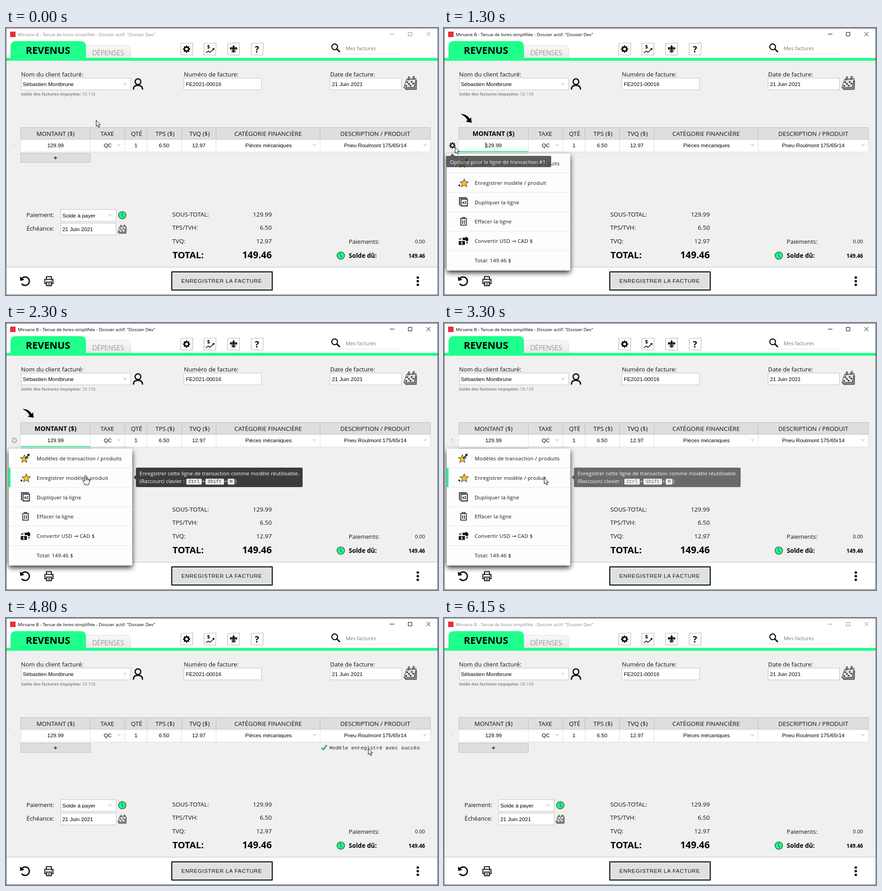
Write an HTML page that moves like this. It is 951 px wide and 589 px high and loops after 6250 ms.

```html
<!DOCTYPE html>
<html lang="fr">
<head>
<meta charset="utf-8">
<title>Tenue de livres</title>
<style>
html, body { margin: 0; width: 100%; height: 100%; overflow: hidden; background: #fff; }
svg { display: block; position: absolute; left: 0; top: 0; }
text { white-space: pre; }
.o { font-family: "Open Sans", "Noto Sans", sans-serif; }
.a { font-family: "Liberation Sans", Arial, sans-serif; }
.m { font-family: "Liberation Mono", "Courier New", monospace; }
.d { font-family: "DejaVu Sans", sans-serif; }
#menu { filter: drop-shadow(0 5px 6px rgba(0, 0, 0, .8)); }
#save { filter: drop-shadow(0 0 1.5px rgba(30, 255, 140, .7)); }
</style>
</head>
<body>
<svg id="stage" width="951" height="589" viewBox="0 0 951 589"></svg>
<script>
const GREEN = '#1eff8c', LOOP = 6250, STEP = 50;
const stage = document.getElementById('stage');

// ---- drawing helpers ----
const attrs = o => Object.entries(o).map(([k, v]) => `${k}="${v}"`).join(' ');
const text = (x, y, s, size, o = {}) => {
  const { cls = 'o', fill = '#111', ...rest } = o;
  return `<text class="${cls}" x="${x}" y="${y}" font-size="${size}" fill="${fill}" ${attrs(rest)}>${s}</text>`;
};
const mid = { 'text-anchor': 'middle' }, end = { 'text-anchor': 'end' }, bold = { 'font-weight': 700 };
const field = (x, y, s, o = {}) => text(x, y, s, 11.8, { cls: 'a', fill: '#000', ...o });
const rect = (x, y, w, h, fill, o = {}) =>
  `<rect x="${x}" y="${y}" width="${w}" height="${h}" fill="${fill}" ${attrs(o)}/>`;
const box = (x, y, w, h, fill = '#fff', stroke = '#c2c2c2') =>
  rect(x + .5, y + .5, w - 1, h - 1, fill, { stroke });
const path = (d, o = {}) => `<path d="${d}" ${attrs(o)}/>`;
const line = (d, w = 1, stroke = '#000', o = {}) =>
  path(d, { fill: 'none', stroke, 'stroke-width': w, ...o });
const circle = (x, y, r, fill, o = {}) => `<circle cx="${x}" cy="${y}" r="${r}" fill="${fill}" ${attrs(o)}/>`;
const at = (x, y, s, k = 1) => `<g transform="translate(${x} ${y}) scale(${k})">${s}</g>`;
const group = (id, s) => `<g id="${id}">${s}</g>`;
const drop = (x, y) => path(`M${x - 4.5} ${y - 2.5}h9l-4.5 5z`, { fill: '#dcdcdc' });

function gear(x, y, r, o = {}) {
  const pts = [];
  for (let i = 0; i < 8; i++)
    for (const [da, k] of [[-.34, .74], [-.22, 1], [.22, 1], [.34, .74]]) {
      const a = (i + da) * Math.PI / 4;
      pts.push(`${(x + Math.sin(a) * r * k).toFixed(2)} ${(y - Math.cos(a) * r * k).toFixed(2)}`);
    }
  const h = r * .38;
  return path(`M${pts.join('L')}ZM${x - h} ${y}a${h} ${h} 0 1 0 ${2 * h} 0a${h} ${h} 0 1 0 ${-2 * h} 0Z`,
    { 'fill-rule': 'evenodd', ...o });
}

function star(x, y, r) {
  let d = '';
  for (let i = 0; i < 10; i++) {
    const a = i * Math.PI / 5, k = i % 2 ? r * .43 : r;
    d += `${i ? 'L' : 'M'}${(x + Math.sin(a) * k).toFixed(2)} ${(y - Math.cos(a) * k).toFixed(2)}`;
  }
  return path(d + 'Z', { fill: '#fcc21b', stroke: '#222', 'stroke-width': 1, 'stroke-linejoin': 'round' });
}

const clock = (x, y) => circle(x, y, 8.3, GREEN, { stroke: '#222', 'stroke-width': 1.1 }) +
  line(`M${x - .5} ${y - 6}V${y + .5}L${x + 3} ${y + 4}`, 1.3, '#164');

const tile = x => path(`M${x} 34L${x + 26.5} 33L${x + 25.5} 60L${x - .5} 59Z`,
  { fill: '#fdfdfd', stroke: '#b9b9b9', 'stroke-width': 1.2 });

function calendar() {
  let s = path('M24 7L28 10L27.500 29.500L4 30L0 25Z', { fill: '#888', stroke: '#222' }) +
    path('M6 7L27 5L22.500 24.500L0 25.500Z', { fill: '#fff', stroke: '#222', 'stroke-width': 1.1 }) +
    path('M6 7L27 5L26.200 8.500L5 10.500Z', { fill: '#999' });
  for (let r = 0; r < 3; r++)
    for (let c = 0; c < 4; c++)
      s += rect(5.6 + c * 4.8 - r * 1.3, 12 + r * 4.2 - c * .3, 3.8, 3, (r + c) % 2 ? '#ccc' : '#222');
  return s + line('M9.500 9V3q1.500-3 3 0V7M20 8V2q1.500-3 3 0V6', 1.4, '#222');
}

// ---- window ----
const bar = rect(0, 0, 951, 589, '#fff') + rect(9, 8, 12, 12, '#e8303a') +
  group('caption', text(26, 17.5, 'Mirvane B - Tenue de livres simplifiée - Dossier actif: "Dossier Dev"', 9.85, { fill: 'currentColor' }) +
    line('M845 13.5h10M885.5 9.5h8v8h-8zM925.5 9l9 9M934.5 9l-9 9', 1, 'currentColor'));

const tabs = `<linearGradient id="tab" x1="0" y1="0" x2="0" y2="1">
  <stop offset="0" stop-color="#f8f8f8"/><stop offset="1" stop-color="#e9e9e9"/></linearGradient>` +
  path('M172 66V38H264Q275 38 275 49V66Z', { fill: 'url(#tab)', stroke: '#dedede' }) +
  path('M10 68V41Q10 29 22 29H164Q176 29 176 41V68Z', { fill: GREEN }) +
  rect(0, 66, 951, 6.5, GREEN) +
  text(92.5, 56.5, 'REVENUS', 21.5, { ...mid, ...bold, fill: '#000' }) +
  text(190, 60, 'DÉPENSES', 14.7, { fill: '#666', 'font-weight': 300 });

const fleur = path('M0-9Q4.600-4 1.400 1.500H-1.400Q-4.600-4 0-9Z') +
  [1, -1].map(k => `<g transform="scale(${k} 1)">` +
    path('M2.600 1.500Q2.400-4 5.500-4.200Q9.500-3.500 7.500 .8Q6.500 2 5.400 1Q6.400-.8 5.100-1.200Q3.900-.8 3.900 1.500ZM.8 4H3Q3.200 6 5 6.500Q3 8 1.600 5.800L0 9V4Z') + '</g>').join('') +
  rect(-4.5, 2, 9, 1.5, '#000');

const icons = [385, 436, 488, 540].map(tile).join('') + gear(397.5, 46.5, 8) +
  text(446, 45, '$', 11, { ...mid, ...bold, fill: '#000' }) +
  line('M440 55l5-4 4 2.5 8-7', 1.5) + path('M454 45l5-1-1 5z') +
  at(501, 46.5, fleur) +
  text(552.5, 53.5, '?', 19, { ...mid, ...bold, fill: '#000' }) +
  circle(723.5, 41.5, 6.3, 'none', { stroke: '#000', 'stroke-width': 2.2 }) + line('M728 46l7 7', 3) +
  text(748, 49, 'Mes factures', 11.1, { fill: '#777' }) + rect(714, 57, 154, 1, '#e0e0e0');

const form = rect(0, 72.5, 951, 454.5, '#f0f0f0') +
  text(33, 107, 'Nom du client facturé:', 13.25) + text(391.5, 107, 'Numéro de facture:', 13.25) +
  text(713.5, 107, 'Date de facture:', 13.25) +
  box(33, 110, 242, 27) + box(391, 110, 172, 27) + box(713, 110, 158, 27) + drop(262, 124) +
  field(37, 128, 'Sébastien Montbrune') + field(396, 128, 'FE2021-00016') + field(717.5, 128, '21 Juin 2021') +
  text(33, 149, 'Solde des factures impayées:', 9.2, { ...bold, fill: '#8a8a8a' }) +
  text(168, 149, '58.10$', 9.3, { fill: '#8a8a8a' }) +
  circle(290.5, 118.5, 6.3, 'none', { stroke: '#111', 'stroke-width': 2.8 }) +
  line('M280.5 136Q280 126.500 290.500 126.500Q301 126.500 300.500 136', 2.8, '#111') + at(876, 106, calendar());

const cols = [32, 185, 261, 310, 386, 462, 691, 935];
const heads = [[223, 'TAXE'], [287.5, 'QTÉ'], [350, 'TPS ($)'], [426, 'TVQ ($)'],
  [577, 'CATÉGORIE FINANCIÈRE'], [813, 'DESCRIPTION / PRODUIT']];
const cells = [[109, '129.99'], [224, 'QC'], [286, '1'], [348, '6.50'], [424.5, '12.97'],
  [578, 'Pièces mécaniques'], [813, 'Pneu Roulmont 175/65r14']];
const table = rect(32, 246, 903, 27, '#fff') + rect(32, 219, 903, 27, '#dedede') +
  line('M32.5 246V273.5H934.5V246' + cols.slice(1, -1).map(x => `M${x + .5} 246v27`).join(''), 1, '#dcdcdc') +
  line('M32.500 219.500H934.500V245.500H32.500Z' + cols.slice(1, -1).map(x => `M${x + .5} 219v27`).join(''), 1, '#bdbdbd') +
  heads.map(([x, s]) => text(x, 238, s, 13.4, mid)).join('') +
  cells.map(([x, s]) => field(x, 262.5, s, mid)).join('') +
  drop(249, 259) + drop(679, 259) + drop(922, 259) +
  box(32, 276, 154, 21, '#dedede', '#bbb') + line('M105.500 286.500h7M109 283v7', 1.3, '#111') +
  group('headOff', text(109, 238, 'MONTANT ($)', 13.4, mid)) +
  group('headOn', text(109, 238, 'MONTANT ($)', 13.9, { ...mid, ...bold, fill: '#000' }) +
    rect(33, 271.5, 152, 2, GREEN) +
    path('M36 189.500Q50 189 56.500 200.500L59.500 197L61 209L47.500 206.500L52 203.500Q47 194.500 36 189.500Z')) +
  group('caret', rect(91, 252, 1, 13, '#000')) +
  group('numSmall', text(18.5, 262, '1', 8, { ...mid, fill: '#c8b27a' })) +
  group('numBig', text(18.5, 264, '1', 12, { ...mid, fill: '#a8a8a8' })) +
  group('gear', gear(18.5, 259, 7, { fill: 'currentColor' }));

const sums = [[415.5, 'SOUS-TOTAL:', '129.99'], [445, 'TPS/TVH:', '6.50'], [474.5, 'TVQ:', '12.97']];
const footer = text(106, 416.5, 'Paiement:', 13, end) + text(106, 447, 'Échéance:', 13, end) +
  box(120, 400, 123, 27) + box(120, 430, 123, 27) + drop(229, 414) +
  field(124, 418, 'Solde à payer') + field(124, 448, '21 Juin 2021') +
  clock(256, 413) + at(246, 433, calendar(), .68) +
  sums.map(([y, a, b]) => text(366, y, a, 13.3) + text(585, y, b, 13.3, end)).join('') +
  text(366.5, 508, 'TOTAL:', 20.4, { ...bold, fill: '#000' }) +
  text(585, 508, '149.46', 20.7, { ...bold, ...end, fill: '#000' }) +
  text(754.5, 475.5, 'Paiements:', 13.1) + text(922.5, 475, '0.00', 11.2, end) + clock(737, 502) +
  text(754.5, 507, 'Solde dû:', 13.6, { ...bold, fill: '#000' }) +
  text(922.5, 507, '149.46', 11.6, { ...bold, ...end, fill: '#000' }) +
  rect(0, 528, 951, 61, '#fff') + rect(0, 527, 951, 1, '#bdbdbd') +
  line('M35 552.500A9.300 9.300 0 1 1 34.500 564', 3, '#111') + path('M30.500 548.500L31.500 558L40.500 555.500Z') +
  line('M89 554V548.500H100V554M89 564H85.500V554.500H103.500V564H100M89 560.500H100V568.500H89Z', 2, '#111') +
  line('M91.500 563.500h6M91.500 566h6', 1) + circle(100.5, 557.5, 1, '#111') +
  [550.5, 558.5, 566.5].map(y => circle(906.5, y, 2.8, '#111')).join('') +
  group('save', rect(365, 538, 221, 40, '#e0e0e0', { stroke: '#000', 'stroke-width': 2 })) +
  text(386, 562, 'ENREGISTRER LA FACTURE', 11.8, { cls: 'a', 'letter-spacing': .78 });

const saved = group('saved', line('M694.500 286.500L698.500 290L706 280.500', 3.2, '#1a7a4a') +
  line('M694.500 286.500L698.500 290L706 280.500', 1.8, '#2fd882') +
  text(712, 290, 'Modèle enregistré avec succès', 11.44, { cls: 'm', fill: '#222' }));

// ---- menu and tooltips ----
const items = ['Modèles de transaction / produits', 'Enregistrer modèle / produit', 'Dupliquer la ligne',
  'Effacer la ligne', 'Convertir USD <tspan class="d">→</tspan> CAD $', 'Total: 149.46 $'];
const menuIcons = star(40.5, 300, 9.5) + line('M42 299l7-7', 2) + path('M46 289.500l6-1-1 6z') +
  star(44.5, 342.5, 10) + line('M31.500 347.500h5M34 345v5', 1.4) +
  line('M34 391V374.500H50M37.500 377.500H51.500V392.500H37.500Z', 1.8, '#111') +
  text(44.5, 388, 'x2', 8, { ...mid, ...bold }) +
  line('M37 422V435H49V422M35 420.500H51M40 420V418H46V420M41 424v8M45 424v8', 1.6, '#111') +
  path('M32.500 470H46V478.500H32.500ZM41 462.500H48V460L53.500 464L53 470H48V468H41Z', { fill: '#111' }) +
  line('M34.500 468V465H39M48.500 474.500H51V471', 1.6, '#111') +
  text(39, 477.5, '$', 8, { ...mid, ...bold, fill: '#fff' });
const menu = group('menu', rect(6, 277, 272, 258, '#fdfdfd', { rx: 3 })) +
  group('items', [1, 2, 3, 4, 5].map(i => rect(6, 276 + i * 42.9, 272, 1, '#e6e6e6')).join('') +
    group('mark', rect(6, 277, 4, 42, GREEN)) + menuIcons +
    items.map((s, i) => text(67.5, 303 + i * 42.8, s, 11.4, { 'letter-spacing': .25 })).join(''));

const DARK = '#3c3c3c', white = { fill: '#fff' };
const key = (x, w, s) => rect(x, 343.5, w, 13, '#eee', { rx: 2 }) +
  text(x + w / 2, 353, s, 10.1, { cls: 'm', fill: '#333', ...mid });
function tip(id, w, msg, keys) {
  let x = 397, s = '';
  keys.forEach(([k, kw], i) => {
    if (i) { s += text(x + .5, 353, '+', 11.6, white); x += 8; }
    s += key(x, kw, k);
    x += kw;
  });
  return group(id, rect(286, 319, w, 43, DARK, { rx: 3 }) + path('M281 340.500l5-5v10z', { fill: DARK }) +
    text(294, 336, msg, 11.6, white) + text(294, 353, '(Raccourci clavier :', 11.6, white) +
    s + text(x + 1, 353, ')', 11.6, white));
}
const tips = group('tipGear', rect(5, 282, 231, 25, DARK, { rx: 3 }) + path('M13 282.500l5.500-5.500 5.500 5.500z', { fill: DARK }) +
    text(13, 299.5, 'Options pour la ligne de transaction #1.', 11.6, white)) +
  at(0, -43, tip('tipUse', 287, 'Utiliser un modèle de transaction pour cette ligne.', [['Ctrl', 34], ['M', 15]])) +
  tip('tipSave', 367, 'Enregistrer cette ligne de transaction comme modèle réutilisable.', [['Ctrl', 34], ['Shift', 41], ['M', 15]]);

const ink = { fill: '#fff', stroke: '#000', 'stroke-width': 1, 'stroke-linejoin': 'round' };
const pointer = group('pointer',
  group('arrow', path('M.5 .5V14L3.600 11.200L5.900 16.500L8 15.600L5.800 10.400H10Z', ink)) +
  group('hand', path('M-1.700 2Q-1.700 .5 0 .5Q1.500 .5 1.500 2V7Q3 6 4 7.500Q5.600 6.700 6.400 8.300Q8.500 8 8.500 10V15Q8.500 17 7.300 18.500V21H-2V19L-5.500 13.500Q-6.500 11 -4.500 11L-1.700 13Z', ink) +
    line('M1.500 7v4M4 7.500v3.500M6.400 8.500v2.500')));

stage.innerHTML = bar + tabs + icons + form + table + footer + saved + menu + tips +
  group('frame', line('M.5 .5H950.500V588.500H.5Z', 1, 'currentColor')) + pointer;

// ---- timeline ----
const MOVES = [[0, 198, 203], [100, 180, 211], [250, 108, 236], [400, 40, 261], [500, 24, 266],
  [800, 24, 266], [850, 24, 262], [1750, 24, 262], [1850, 46, 275], [2100, 154, 332], [2300, 175, 336],
  [2400, 181, 337], [2500, 181, 337], [2650, 192, 338], [2750, 192, 338], [3150, 220, 341],
  [3750, 220, 341], [3850, 240, 346], [4300, 700, 290], [4400, 700, 290], [4650, 823, 287],
  [4800, 797, 287], [5050, 622, 317], [5500, 113, 576]];
const FADES = {
  tipGear: [[750, 0], [1100, 1], [1200, 1], [1300, .83], [1500, 0]],
  tipUse: [[1950, 0], [2050, .15], [2100, .08], [2150, 0]],
  tipSave: [[2050, 0], [2100, .18], [2250, 1], [3250, 1], [3300, .75], [3450, 0]]
};
const SPANS = {
  headOn: [1250, 3250], caret: [1250, 1800], gear: [450, 3250], numBig: [3250, 3450],
  menu: [1250, 3350], items: [1250, 3350], mark: [1850, 3350], saved: [3350, 5850],
  pointer: [0, 5550], hand: [1900, 3200]
};

function sample(track, t, col = 1) {
  if (t <= track[0][0]) return track[0][col];
  for (let i = 1; i < track.length; i++) {
    const a = track[i - 1], b = track[i];
    if (t < b[0]) return a[col] + (b[col] - a[col]) * (t - a[0]) / (b[0] - a[0]);
  }
  return track[track.length - 1][col];
}
const el = id => document.getElementById(id);
const show = (id, on) => { el(id).style.display = on ? '' : 'none'; };
const within = (t, [a, b]) => t >= a && t < b;

function draw(t) {
  for (const id in SPANS) show(id, within(t, SPANS[id]));
  for (const id in FADES) el(id).style.opacity = sample(FADES[id], t);
  show('headOff', !within(t, SPANS.headOn));
  show('numSmall', !within(t, [450, 3450]));
  show('arrow', !within(t, SPANS.hand));
  const active = within(t, [1250, 6150]);
  el('caption').style.color = active ? '#000' : '#8a8a8a';
  el('frame').style.color = active ? '#444' : '#666';
  el('gear').style.color = t < 1850 ? '#111' : '#bbb';
  const y = sample(MOVES, t, 2);
  el('mark').setAttribute('transform', `translate(0 ${y < 319 ? 0 : 43})`);
  el('pointer').setAttribute('transform', `translate(${sample(MOVES, t)} ${y})`);
}

const start = performance.now();
function tick() {
  const t = (performance.now() - start) % LOOP;
  draw(Math.floor(t / STEP) * STEP);
  requestAnimationFrame(tick);
}
tick();
</script>
</body>
</html>
```
